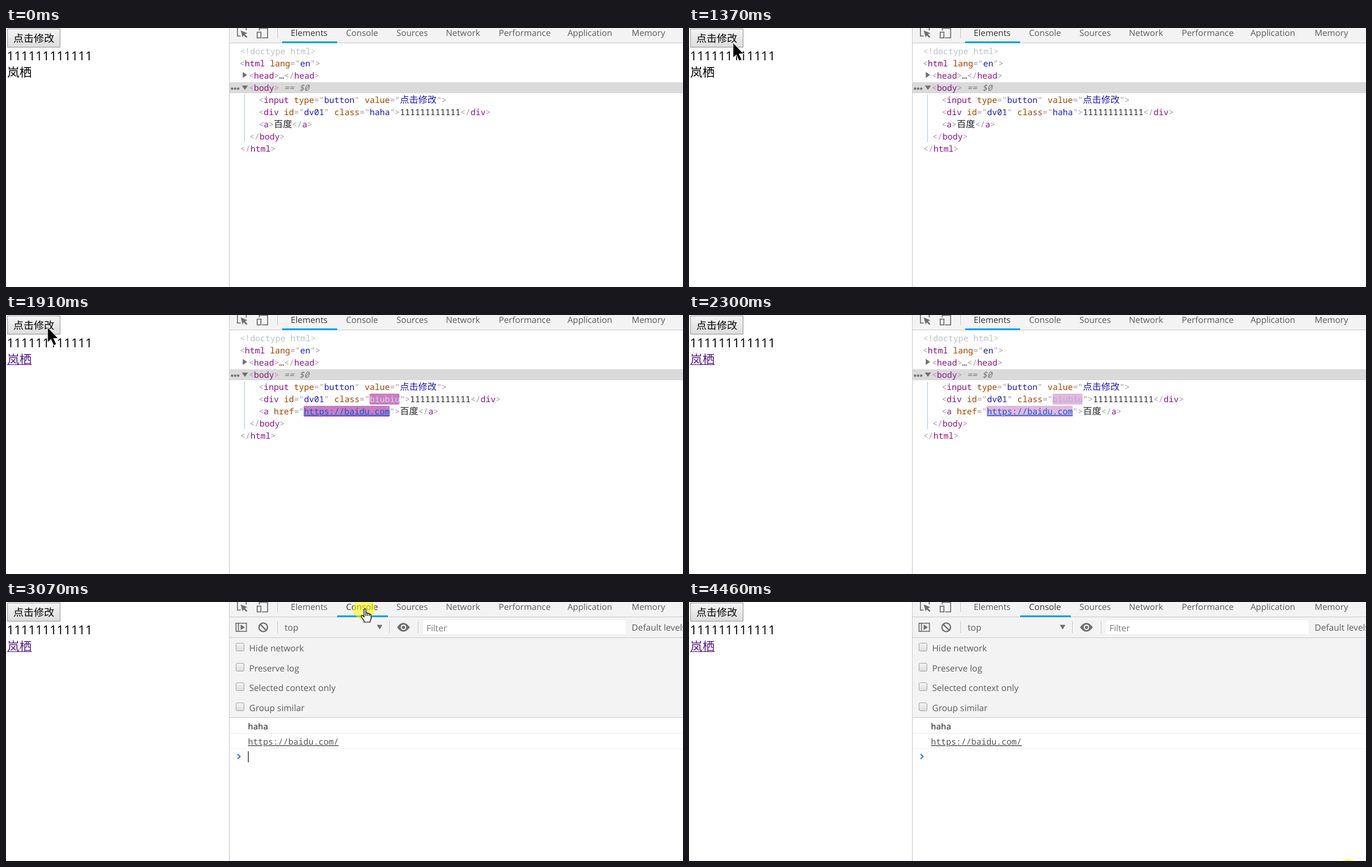
Write an HTML page that moves like this. It is 1108 px wide and 425 px high and loops after 4.63 s.

```html
<!DOCTYPE html>
<html lang="en">
<head>
<meta charset="utf-8">
<title>Attribute change demo</title>
<style>
html, body { margin: 0; width: 100%; height: 100%; overflow: hidden; background: #fff; }
svg { display: block; text-rendering: geometricPrecision; }
.page { font-family: "Noto Sans CJK SC", "Noto Sans CJK", sans-serif; }
.digits { font: 20.4px "Open Sans", "Noto Sans", sans-serif; }
.ui { font: 14px "Open Sans", "Noto Sans", sans-serif; fill: #5a5a5a; }
#options { font-size: 14.3px; }
.mono { font: 13.75px "Noto Sans Mono", "DejaVu Sans Mono", monospace; fill: #222; }
.b { fill: #a894a6; }
.t { fill: #881280; }
.n { fill: #994500; }
.v { fill: #1a1aa6; }
.f { fill: var(--flash-text); }
.u { fill: #15c; text-decoration: underline; }
.c { font: 15px "Noto Sans CJK SC", "Noto Sans CJK", sans-serif; }
.line { stroke: #ccc; }
.icon { fill: none; stroke: #6e6e6e; stroke-width: 1.6; }
.bold { stroke-width: 2.2; }
.solid { fill: #6e6e6e; }
</style>
</head>
<body>
<svg width="1108" height="425" viewBox="0 0 1108 425">
  <defs>
    <linearGradient id="up" x2="0" y2="1"><stop stop-color="#f5f5f5"/><stop offset="1" stop-color="#dcdcdc"/></linearGradient>
    <linearGradient id="down" x2="0" y2="1"><stop stop-color="#dcdcdc"/><stop offset="1" stop-color="#f5f5f5"/></linearGradient>
  </defs>

  <g class="page">
    <rect id="button" x="2.5" y="1.5" width="86" height="30" stroke="#999"/>
    <text x="12" y="23" font-size="16.75">点击修改</text>
    <text class="digits" x="1.500" y="53">111111111111</text>
    <text id="link" x="2" y="79.5" font-size="20">岚栖</text>
    <path id="underline" d="M2 81.5H42" stroke="#551a8b"/>
  </g>

  <path class="line" d="M365.5 0V425"/>
  <rect x="366" width="742" height="24" fill="#f3f3f3"/>
  <rect id="hover" x="542" width="83" height="24" fill="#e9e9e9"/>
  <path class="line" d="M366 24.5H1108M444.5 0V17"/>
  <path class="icon" d="M378.8 0V13.2H384M393.2 0V4M414.5 0V4M414.5 .5H428.2V16.2H419M411.2 6.8H417.2V16.2H411.2Z"/>
  <path class="solid" d="M384 4L395 8.5L391 10.2L395 14.5L393.3 16.2L389 12L387.3 15.5Z"/>
  <g id="tabs" class="ui"></g>
  <rect id="marker" y="22" height="3" fill="#069fea"/>

  <g id="elements" class="mono">
    <rect x="366" y="89" width="742" height="18" fill="#dadada"/>
    <g fill="#6e6e6e"><circle cx="370" cy="99.5" r="1.9"/><circle cx="375" cy="99.5" r="1.9"/><circle cx="380" cy="99.5" r="1.9"/>
    <path d="M387.5 72V82L394.5 77ZM386 94.5H396L391 101.5Z"/></g>
    <path d="M390.5 109V187" stroke="#a9cbee"/>
    <g id="flash"><rect x="595" y="129" width="49" height="18" rx="2"/><rect x="487" y="149" width="141" height="18" rx="2"/></g>
    <g id="common"></g><g id="before"></g><g id="after"></g>
  </g>

  <g id="console">
    <rect x="366" y="25" width="742" height="164" fill="#f3f3f3"/>
    <rect x="683" y="30" width="331" height="23" fill="#fff"/>
    <path class="line" d="M366 58.5H1108M366 189.5H1108M444.5 31V51M627.5 31V51M674.5 31V51"/>
    <path d="M366 215.5H1108M366 240.5H1108" stroke="#f0f0f0"/>
    <path class="icon" d="M376.5 34.8H393.5V48.2H376.5ZM380.5 35V48"/>
    <path class="icon bold" d="M416 36.5L426 46.5"/>
    <circle class="icon bold" cx="421" cy="41.5" r="7"/>
    <path class="solid" d="M384 37V46L391 41.5ZM607 37.5H616L611.5 45ZM640 41.5Q650 27 661 41.5Q650 56 640 41.5Z"/>
    <circle cx="650.5" cy="41.5" r="4.5" fill="#f3f3f3"/><circle class="solid" cx="650.5" cy="41.5" r="2.6"/>
    <g id="options" class="ui">
      <text x="456" y="46.5">top</text>
      <text x="688" y="47.5" fill="#777">Filter</text>
      <text x="1024" y="46.5">Default levels</text>
    </g>
    <g class="mono">
      <text x="396" y="209">haha</text>
      <text x="396" y="234" fill="#545454" text-decoration="underline">https://baidu.com/</text>
    </g>
    <path d="M379 249.5L383 253.5L379 257.5" fill="none" stroke="#367cf1" stroke-width="2"/>
    <path id="caret" d="M396.5 245V263" stroke="#000"/>
  </g>

  <g id="cursor">
    <circle id="halo" r="18" fill="#ff0" opacity=".55"/>
    <path id="arrow" d="M0 0V25L5.5 20L10 30L14.5 28L10 18.5H17.5Z" stroke="#fff"/>
    <path id="hand" d="M0 1.5Q0 0 1.5 0T3 1.5V7Q5.5 6 6 8Q8.5 7 9 9Q11.5 8.5 11.5 11V16Q11.5 18 10 20V22H0V20L-4.5 13Q-5 10.5-2.5 11L0 13.5ZM3 7V12M6 8V12M9 9V12" fill="#fff" stroke="#000" stroke-width="1.2"/>
  </g>
</svg>

<script>
const LOOP = 4630, CLICK = 1620, OPEN = 3070;
const $ = id => document.getElementById(id);
const show = (id, on) => $(id).style.display = on ? '' : 'none';
const span = (cls, s) => `<tspan class="${cls}">${s.replace('<', '&lt;')}</tspan>`;
const valueClass = v => v === 'biubiu' ? 'f' : v.startsWith('http') ? 'u' : 'v';

const highlight = s => s
  .replace(/(<\/?)(\w+)([^>]*)>/g, (_, open, tag, attrs) =>
    span('b', open) + span('t', tag) +
    attrs.replace(/(\w+)="([^"]*)"/g, (_, n, v) =>
      span('n', n) + span('b', '="') + span(valueClass(v), v) + span('b', '"')) +
    span('b', '&gt;'))
  .replace(/[\u4e00-\u9fff]+/g, s => `<tspan class="c">${s}</tspan>`);
const row = (x, i, s) => `<text x="${x}" y="${43 + 20 * i}">${highlight(s)}</text>`;

$('common').innerHTML =
  '<text x="383" y="43" fill="#b8c2c4" font-weight="500">&lt;!doctype html&gt;</text>' +
  row(382.5, 1, '<html lang="en">') + row(397.5, 2, '<head>…</head>') + row(397.5, 3, '<body>') +
  '<text x="455" y="103" fill="#777" font-style="italic">== $0</text>' +
  row(413.5, 4, '<input type="button" value="点击修改">') +
  row(398.5, 7, '</body>') + row(383.5, 8, '</html>');
$('before').innerHTML = row(413.5, 5, '<div id="dv01" class="haha">111111111111</div>') + row(413.5, 6, '<a>百度</a>');
$('after').innerHTML = row(413.5, 5, '<div id="dv01" class="biubiu">111111111111</div>') +
  row(413.5, 6, '<a href="https://baidu.com">百度</a>');

const tabs = { Elements: 466, Console: 556.5, Sources: 639, Network: 720, Performance: 806.5, Application: 919, Memory: 1024 };
$('tabs').innerHTML = Object.entries(tabs).map(([s, x]) => `<text id="tab${s}" x="${x}" y="13">${s}</text>`).join('');
$('options').innerHTML += ['Hide network', 'Preserve log', 'Selected context only', 'Group similar'].map((s, i) => {
  const y = 68 + Math.round(32.5 * i);
  return `<rect x="376.5" y="${y - .5}" width="13" height="13" rx="2" fill="url(#up)" stroke="#a5a5a5"/>
    <text x="398" y="${y + 12.5}">${s}</text>`;
}).join('');

// Screen updates come in bursts: first time, last time, count
const bursts = [[0, 0, 1], [500, 990, 7], [1050, 1510, 7], [1620, 1910, 4], [2070, 2070, 1], [2210, 2300, 2],
  [2530, 2990, 7], [3070, 3220, 3], [3620, 4080, 7], [4160, 4250, 2], [4460, 4460, 1]];
const steps = bursts.flatMap(([a, b, n]) => Array.from({ length: n }, (_, i) => n > 1 ? a + (b - a) * i / (n - 1) : a));

// Time followed by the values at that time
const path = [[500, 261, 284], [990, 87, 27], [1370, 71, 24], [1910, 68, 20], [2209, 68, 20], [2210, 300, -40],
  [2750, 600, -30], [2990, 579, 11], [3220, 599, 11], [3620, 599, 11], [4250, 1073, 418], [4460, 1079, 440]];
const flashFill = [[1620, 158, 54, 153], [1910, 199, 126, 195], [2300, 225, 185, 223], [2700, 241, 220, 241], [2990, 250, 241, 251]];
const flashText = [[1620, 255, 255, 255], [1910, 224, 212, 228], [2300, 190, 170, 200], [2990, 62, 54, 172]];

function at(keys, t) {
  const i = keys.findIndex(k => k[0] > t);
  if (i <= 0) return keys[i ? keys.length - 1 : 0].slice(1);
  const [a, b] = [keys[i - 1], keys[i]], p = (t - a[0]) / (b[0] - a[0]);
  return a.slice(1).map((v, j) => v + (b[j + 1] - v) * p);
}
const rgb = (keys, t) => `rgb(${at(keys, t).map(Math.round)})`;
const within = (t, ...ranges) => ranges.some(([a, b]) => t >= a && t < b);

function draw(now) {
  const time = now % LOOP;
  const t = steps.findLast(s => s <= time);
  const changed = t >= CLICK, opened = t >= OPEN;

  $('button').setAttribute('fill', `url(#${within(t, [1510, CLICK]) ? 'down' : 'up'})`);
  $('link').setAttribute('fill', changed ? '#551a8b' : '#000');
  show('underline', changed);
  show('elements', !opened);
  show('console', opened);
  show('before', !changed);
  show('after', changed);
  show('flash', changed);
  $('flash').setAttribute('fill', rgb(flashFill, t));
  document.body.style.setProperty('--flash-text', rgb(flashText, t));

  $('marker').setAttribute('x', opened ? 542 : 452);
  $('marker').setAttribute('width', opened ? 83 : 90);
  $('tabElements').style.fill = opened ? '' : '#333';
  $('tabConsole').style.fill = opened ? '#333' : '';
  show('caret', within(t, [OPEN, 3700], [4200, 4460]));

  const [x, y] = at(path, t).map(Math.round);
  const onTab = t > 2500 && y > -1 && y < 25;
  show('cursor', t >= 500);
  show('hover', onTab && !opened);
  show('hand', onTab);
  show('arrow', !onTab);
  show('halo', within(t, [1510, 1710], [2990, 3220], [4460, LOOP]));
  $('cursor').setAttribute('transform', `translate(${x} ${y})`);
}

const start = performance.now();
function tick() {
  draw(performance.now() - start);
  requestAnimationFrame(tick);
}
tick();
</script>
</body>
</html>
```
